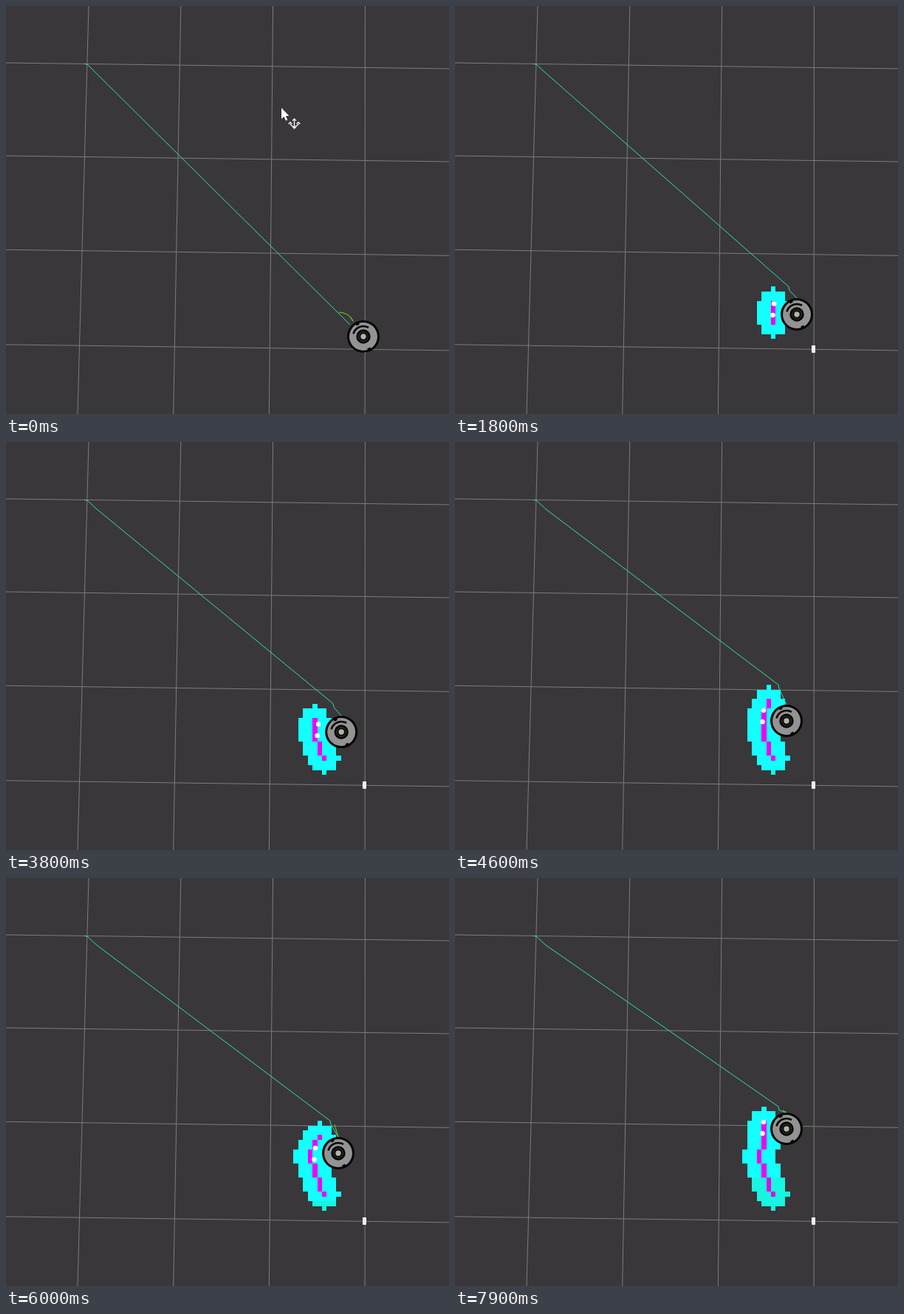
An HTML page with a canvas for the animation above (8 s loop, 600x553 px).

```html
<!DOCTYPE html>
<html>
<head>
<meta charset="utf-8">
<style>
html, body { margin: 0; width: 100%; height: 100%; overflow: hidden; background: #393739; }
canvas { display: block; }
</style>
</head>
<body>
<canvas id="stage" width="600" height="553"></canvas>
<script>
const ctx = document.getElementById('stage').getContext('2d');
const LOOP = 8000, STEP = 100, SEEN = 1000;
const CELL = 6.42, CELL_X = 428, CELL_Y = 399.7;
const GOAL = [110, 79];

// Key points: time, then values.
const robotKeys = [
  [0, 484, 448], [1800, 463, 418], [2900, 460, 410], [4600, 449, 378],
  [6000, 450, 373], [7100, 452, 354], [7900, 449, 340]
];
const wallTopKeys = [[2900, 0], [4600, -8], [6000, -8], [7900, -11]];

function sample(keys, t) {
  const next = keys.findIndex(k => k[0] > t);
  if (next === 0) return keys[0].slice(1);
  if (next < 0) return keys[keys.length - 1].slice(1);
  const a = keys[next - 1], b = keys[next];
  const k = (t - a[0]) / (b[0] - a[0]);
  return a.slice(1).map((v, i) => v + (b[i + 1] - v) * k);
}

function line(points, color, width = 1) {
  ctx.beginPath();
  points.forEach(p => ctx.lineTo(...p));
  ctx.strokeStyle = color;
  ctx.lineWidth = width;
  ctx.stroke();
}

function disc(x, y, r, color) {
  ctx.beginPath();
  ctx.arc(x, y, r, 0, Math.PI * 2);
  ctx.fillStyle = color;
  ctx.fill();
}

function arc(x, y, r, from, to, width, color = '#050505') {
  ctx.beginPath();
  ctx.arc(x, y, r, from * Math.PI / 180, to * Math.PI / 180);
  ctx.strokeStyle = color;
  ctx.lineWidth = width;
  ctx.stroke();
}

function drawGrid() {
  ctx.fillStyle = '#393739';
  ctx.fillRect(0, 0, 600, 553);
  for (let i = 0; i < 4; i++) {
    const y = 77 + 126 * i + 0.65 * i * (i - 1);
    line([[112 + 124.8 * i, 0], [97 + 129.7 * i, 553]], '#7d7b7d');
    line([[0, y], [600, y + 8]], '#7d7b7d');
  }
}

function fillCell(c, r, color) {
  const left = Math.round(CELL_X + c * CELL), right = Math.round(CELL_X + (c + 1) * CELL);
  const top = Math.round(CELL_Y + r * CELL), bottom = Math.round(CELL_Y + (r + 1) * CELL);
  ctx.fillStyle = color;
  ctx.fillRect(left, top, right - left, bottom - top);
}

// The wall leans left going up, then turns straight; it is sensed deeper over time.
function wallColumn(r, t, robotRow) {
  if (r < -5) return r < robotRow - 2.7 ? -1 : -2;
  const depth = Math.min(3, Math.floor(t / 1900));
  return Math.max(Math.floor((r - 4) / 3), -depth);
}

function drawWall(t, y, top) {
  const robotRow = (y - CELL_Y) / CELL - 0.5;
  const cells = [];
  for (let r = top; r <= 4; r++) cells.push([wallColumn(r, t, robotRow), r]);

  // Cells far behind the robot are tinted.
  const behind = r => r > robotRow + 10.5;
  for (const [c, r] of cells) {
    for (let dy = -3; dy <= 3; dy++) {
      for (let dx = -3; dx <= 3; dx++) {
        if (dx * dx + dy * dy <= 9) fillCell(c + dx, r + dy, behind(r + dy) ? '#18f5e0' : '#14ffff');
      }
    }
  }
  for (const [c, r] of cells) fillCell(c, r, behind(r) ? '#dc0cdc' : '#f000f0');
}

function drawHits(t, x, y) {
  const sway = -4 * Math.cos((t - 1800) / 2650 * Math.PI * 2);
  disc(x - 31, y - 10.5 + sway, 3.3, '#fff');
  disc(x - 32.5, y + 5 + sway, 3.3, '#fff');
}

function drawRoute(t, x, y, top) {
  const color = '#2fe0b4', local = '#5fd81c';
  const from = [[106, 78.5], GOAL];
  if (t < SEEN) {
    line([...from, [x - 18, y - 16]], color);
    arc(x - 34, y - 10, 23, -88, -28, 1.2, local);
    return;
  }
  // Skirt the top of the wall, then drop down to the robot.
  const elbow = [x - 11, CELL_Y + (top - 3) * CELL];
  const shoulder = [x, y - 22];
  line([...from, [123, 91], elbow, [elbow[0] + 1, elbow[1] + 5], shoulder], color);
  if (t > 5400) line([[elbow[0] + 6, elbow[1] + 5], shoulder], local);
}

function drawRobot(x, y) {
  disc(x, y, 22, '#050505');
  disc(x, y, 19, '#939393');
  arc(x, y, 14, 195, 300, 2.6);
  arc(x, y, 19, 58, 72, 4);
  arc(x, y, 19, 238, 252, 4);
  disc(x, y, 9.7, '#050505');
  arc(x, y, 6.3, 0, 360, 1, '#444');
  disc(x, y, 3.7, '#b4b4a2');
}

function drawCursor(t) {
  const k = t / 700;
  if (k >= 1) return;
  ctx.save();
  ctx.translate(373 + 142 * k, 138 - 170 * k);
  const arrow = [[0, 0], [0, 15], [3.5, 12], [6, 17.5], [8.3, 16.5], [6, 11], [10.5, 11], [0, 0]];
  line(arrow, '#222', 0.8);
  ctx.fillStyle = '#fff';
  ctx.fill();

  ctx.translate(17.5, 21.5);
  const head = (x, y, d) => line([[x - 2.5, y + d], [x, y], [x + 2.5, y + d]], '#eee', 1.3);
  line([[0, -6], [0, 6]], '#eee', 1.4);
  arc(0, -2, 6, 20, 160, 1.4, '#eee');
  head(0, -6.5, 2.5);
  head(0, 6.5, -2.5);
  head(-5.5, -2, 2.5);
  head(5.5, -2, 2.5);
  ctx.restore();
}

function draw(t) {
  const [x, y] = sample(robotKeys, t);
  const top = Math.round(sample(wallTopKeys, t)[0]);
  drawGrid();
  if (t >= SEEN) {
    drawWall(t, y, top);
    drawHits(t, x, y);
  }
  drawRoute(t, x, y, top);
  ctx.fillStyle = '#f2f2f2';
  ctx.fillRect(483, 460, 5, 10);
  drawRobot(x, y);
  drawCursor(t);
}

const start = performance.now();
function tick() {
  const t = (performance.now() - start) % LOOP;
  draw(Math.floor(t / STEP) * STEP);
  requestAnimationFrame(tick);
}
tick();
</script>
</body>
</html>
```
